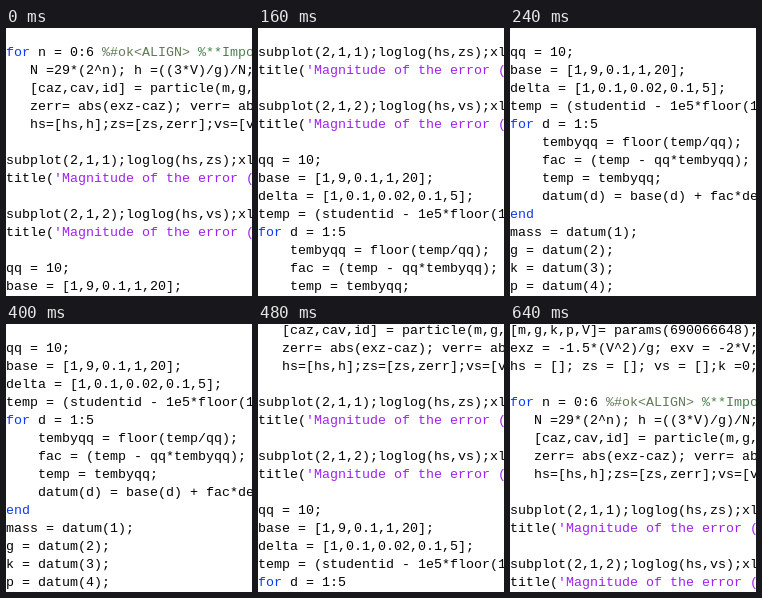
Recreate the animation shown at these times as an HTML page. Size 246 by 268 pixels, loop 720 ms.

```html
<!DOCTYPE html>
<html lang="en">
<head>
<meta charset="utf-8">
<title>Scrolling code</title>
<style>
html, body { margin: 0; width: 100%; height: 100%; overflow: hidden; background: #fff; }
#view { position: relative; width: 100%; height: 100%; overflow: hidden; contain: strict; }
#code {
  position: absolute; left: 0; top: -2px; margin: 0;
  font: 13.333px/18px "Liberation Mono", "Courier New", monospace;
  color: #000; white-space: pre;
}
.key { color: #0a38f5; }
.str { color: #a020f0; }
.note { color: #4a804a; }
.pragma { color: #5f7a55; }
</style>
</head>
<body>
<div id="view"><pre id="code">[m,g,k,p,V]= params(690066648);
exz = -1.5*(V^2)/g; exv = -2*V;
hs = []; zs = []; vs = [];k =0;

<span class="key">for</span> n = 0:6 <span class="pragma">%#ok&lt;ALIGN&gt;</span> <span class="note">%**Impo</span>
   N =29*(2^n); h =((3*V)/g)/N;
   [caz,cav,id] = particle(m,g,
   zerr= abs(exz-caz); verr= ab
   hs=[hs,h];zs=[zs,zerr];vs=[v

subplot(2,1,1);loglog(hs,zs);xl
title(<span class="str">'Magnitude of the error (</span>

subplot(2,1,2);loglog(hs,vs);xl
title(<span class="str">'Magnitude of the error (</span>

qq = 10;
base = [1,9,0.1,1,20];
delta = [1,0.1,0.02,0.1,5];
temp = (studentid - 1e5*floor(1
<span class="key">for</span> d = 1:5
    tembyqq = floor(temp/qq);
    fac = (temp - qq*tembyqq);
    temp = tembyqq;
    datum(d) = base(d) + fac*de
<span class="key">end</span>
mass = datum(1);
g = datum(2);
k = datum(3);
p = datum(4);
V = datum(5);
</pre></div>
<script>
const LINE = 18, STEP = 80;
// First visible line at each step
const tops = [3, 6, 9, 15, 18, 15, 6, 3, 0];

const frames = [...tops, tops[0]].map((top, i) => ({
  offset: i / tops.length,
  transform: `translateY(${-top * LINE}px)`,
  easing: "steps(1, end)"
}));
document.getElementById("code").animate(frames, {
  duration: STEP * tops.length,
  iterations: Infinity
});
</script>
</body>
</html>
```
